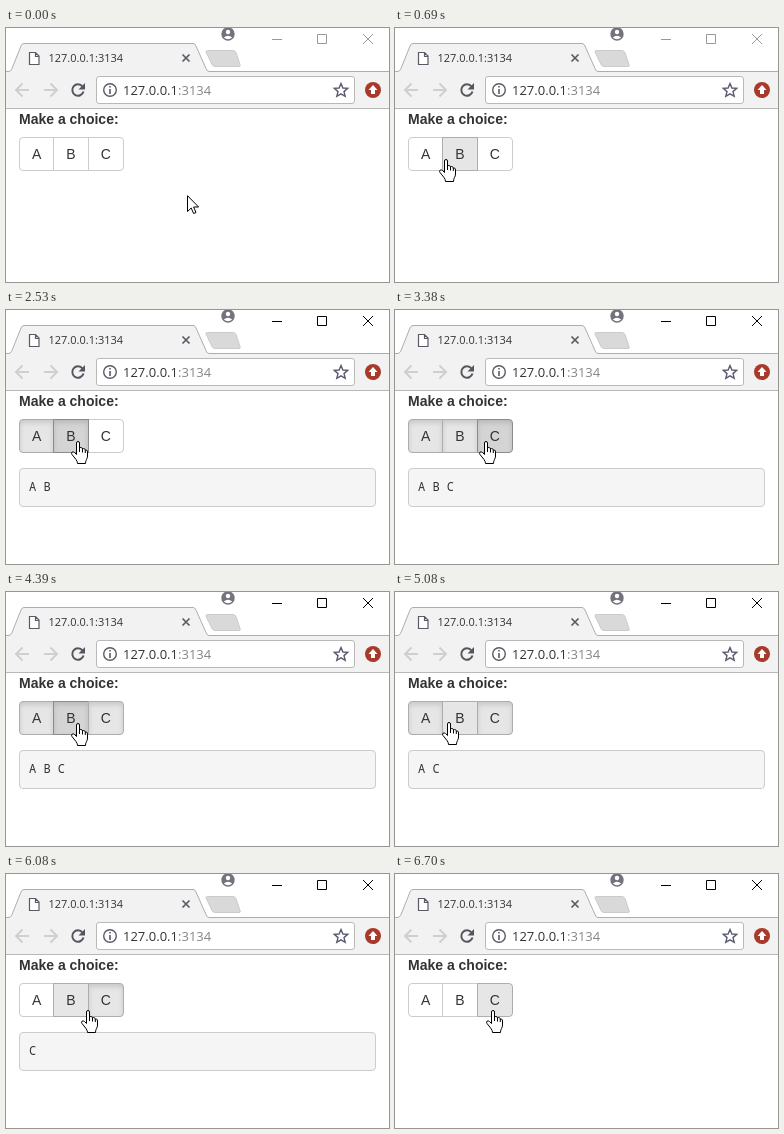
Animation, 383 px wide and 254 px high, one loop 7.71 s. Source, as an HTML page:

```html
<!DOCTYPE html>
<html lang="en">
<head>
<meta charset="utf-8">
<title>Checkbox group buttons</title>
<style>
html, body { margin: 0; width: 100%; height: 100%; overflow: hidden; background: #fff; }
body { position: relative; color: #333; font: 14px/20px "Liberation Sans", Arial, sans-serif; }
svg, b, .group, pre { position: absolute; }
svg { left: 0; top: 0; }
svg text { font-family: "Open Sans", "Noto Sans", sans-serif; }
b { left: 13px; top: 81px; }
.group { left: 13px; top: 109px; display: flex; }
.btn {
  position: relative; padding: 6px 12px; margin-left: -1px;
  border: 1px solid #ccc; background: #fff;
}
.btn:first-child { margin-left: 0; border-radius: 4px 0 0 4px; }
.btn:last-child { border-radius: 0 4px 4px 0; }
.hover, .on { z-index: 2; background: #e6e6e6; border-color: #adadad; }
.on { box-shadow: inset 0 3px 5px rgba(0, 0, 0, .125); }
.on.hover { background: #d4d4d4; border-color: #8c8c8c; }
pre {
  left: 13px; top: 158px; width: 357px; height: 39px; margin: 0; padding: 10px 9px;
  box-sizing: border-box; background: #f5f5f5; border: 1px solid #ccc; border-radius: 4px;
  font: 12px/16px "Noto Sans Mono", "DejaVu Sans Mono", monospace;
}
#pointer { z-index: 3; }
</style>
</head>
<body>
<svg width="383" height="81" fill="none">
  <path d="M0 44H383V80H0Z" fill="#f2f2f2"/>
  <path d="M0 80.5H383" stroke="#b8b8b8"/>
  <path d="M0 43.5H3Q5 43 6 40.500L15 18Q16 15.500 18 15.500H187Q189 15.500 190 18L200 40.500Q201 43.500 203 43.500H383V45H0Z" fill="#f2f2f2"/>
  <path d="M0 43.5H3Q5 43 6 40.500L15 18Q16 15.500 18 15.500H187Q189 15.500 190 18L200 40.500Q201 43.500 203 43.500H383" stroke="#adadad"/>
  <path d="M201.500 22.500H227Q229 22.500 230 24.500L234 36.500Q235 38.500 233 38.500H209Q207 38.500 206 36.500L200 24Q199.500 22.500 201.500 22.500Z" fill="#d9d9d9" stroke="#cbcbcb"/>
  <path d="M23.500 24.500H29.500L33 28V36.500H23.500ZM29.500 24.500V28.500H33" fill="#fff" stroke="#5a5a66" stroke-width="1.2"/>
  <text x="42.500" y="34" font-size="11" fill="#333">127.0.0.1:3134</text>
  <path d="M176.500 26.500L183.500 33.500M183.500 26.500L176.500 33.500" stroke="#5a5a66" stroke-width="1.7"/>
  <circle cx="222" cy="6" r="6.700" fill="#73737e"/>
  <circle cx="222" cy="4" r="2.200" fill="#fff"/>
  <path d="M217.800 9.500Q222 5.800 226.200 9.500Q222 13 217.800 9.500Z" fill="#fff"/>
  <path id="controls" d="M266 11.500H276M311.500 6.500H320.500V15.500H311.500ZM357 6L367 16M367 6L357 16"/>
  <g stroke="#cfcfcf" stroke-width="2">
    <path d="M23 62H10.500M16.500 55.500L10 62L16.500 68.500"/>
    <path d="M38 62H50.500M44.500 55.500L51 62L44.500 68.500"/>
  </g>
  <path d="M76.500 58.500A5.700 5.700 0 1 0 77.500 63.500" stroke="#55555f" stroke-width="2"/>
  <path d="M79 55V61.500H72.500Z" fill="#55555f"/>
  <rect x="90.500" y="48.500" width="258" height="27" rx="2.500" fill="#fff" stroke="#b9b9b9"/>
  <circle cx="104" cy="62" r="6.300" stroke="#5a5a66" stroke-width="1.400"/>
  <path d="M104 58V59.600M104 61V66" stroke="#5a5a66" stroke-width="1.600"/>
  <text x="117" y="67" font-size="13" fill="#333">127.0.0.1<tspan fill="#858585">:3134</tspan></text>
  <path d="M335 55.500L336.900 60L341.700 60.400L338 63.600L339.200 68.300L335 65.800L330.800 68.300L332 63.600L328.300 60.400L333.100 60Z" stroke="#5a5a70" stroke-width="1.400"/>
  <circle cx="367" cy="62" r="8" fill="#a83a2b"/>
  <path d="M367 57L371.500 62H369V66H365V62H362.500Z" fill="#fff"/>
</svg>
<b>Make a choice:</b>
<div class="group"><span class="btn">A</span><span class="btn">B</span><span class="btn">C</span></div>
<pre></pre>
<svg id="pointer" width="20" height="25" fill="#fff" stroke="#000" stroke-linejoin="round">
  <path id="arrow" d="M.5 .7V16.500L4.200 13L6.600 18.500L9 17.500L6.600 12H11.600Z"/>
  <g id="hand">
    <path d="M5.500 13.500V2Q5.500 .5 7 .5T8.500 2V7Q9 6.300 10.200 6.500Q11.500 6.800 11.500 8Q12.300 7.300 13.300 7.700Q14.300 8 14.300 9.200Q15 8.700 15.800 9.200Q16.500 9.700 16.500 11V15Q16.500 17 15.500 18.500Q14.500 20 14.500 22.500H6.500Q6.500 20.500 5 18.500L1 13.500Q0 12 1 11.200Q2.200 10.400 3.500 11.500Z"/>
    <path d="M8.500 7V11M11.500 8V11.500M14.300 9V12" fill="none"/>
  </g>
</svg>
<script>
const LOOP = 7710, TICK = 1000 / 13;

// Pointer tip: [tick, x, y]
const path = [
  [0, 181, 167], [2, 181, 167], [3, 170, 160], [5, 124, 145], [7, 80, 134],
  [9, 50, 131], [11, 38, 131], [13, 32, 131], [22, 32, 131], [23, 47, 129],
  [26, 64, 131], [32, 64, 131], [36, 90, 131], [55, 90, 131], [58, 62, 131],
  [65, 62, 131], [66, 53, 130], [69, 32, 131], [76, 32, 131], [79, 81, 136],
  [82, 97, 136], [101, 97, 136]
];
// Clicks: [tick, letter, ticks until the output follows]
const clicks = [
  [17, "A", 1], [29, "B", 2], [42, "C", 2], [64, "B", 1], [75, "A", 1], [86, "C", 1]
];

const $ = s => document.querySelector(s);
const buttons = [...document.querySelectorAll(".btn")];
const output = $("pre"), pointer = $("#pointer");
const show = (el, on) => { el.style.display = on ? "" : "none"; };

function tipAt(n) {
  const i = path.findIndex(k => k[0] > n);
  const [n0, x0, y0] = path[i - 1], [n1, x1, y1] = path[i];
  const p = (n - n0) / (n1 - n0);
  return [Math.round(x0 + (x1 - x0) * p), Math.round(y0 + (y1 - y0) * p)];
}

const isOn = (letter, n, delayed) =>
  clicks.filter(([at, l, lag]) => l === letter && n >= at + (delayed ? lag : 0)).length % 2 === 1;

function draw(now) {
  const n = Math.floor(now % LOOP / TICK + 0.15);
  const [x, y] = tipAt(n);
  const inside = x >= 13 && x < 118 && y >= 109 && y < 143;
  const hovered = inside ? (x < 48 ? 0 : x < 82 ? 1 : 2) : -1;

  buttons.forEach((b, i) => {
    b.classList.toggle("hover", i === hovered);
    b.classList.toggle("on", isOn(b.textContent, n));
  });
  output.textContent = [..."ABC"].filter(l => isOn(l, n, true)).join(" ");
  show(output, output.textContent);
  $("#controls").style.stroke = n < clicks[0][0] ? "#999" : "#000";

  show($("#arrow"), !inside);
  show($("#hand"), inside);
  pointer.style.transform = `translate(${inside ? x - 6 : x}px, ${y}px)`;
  requestAnimationFrame(draw);
}
requestAnimationFrame(draw);
</script>
</body>
</html>
```
